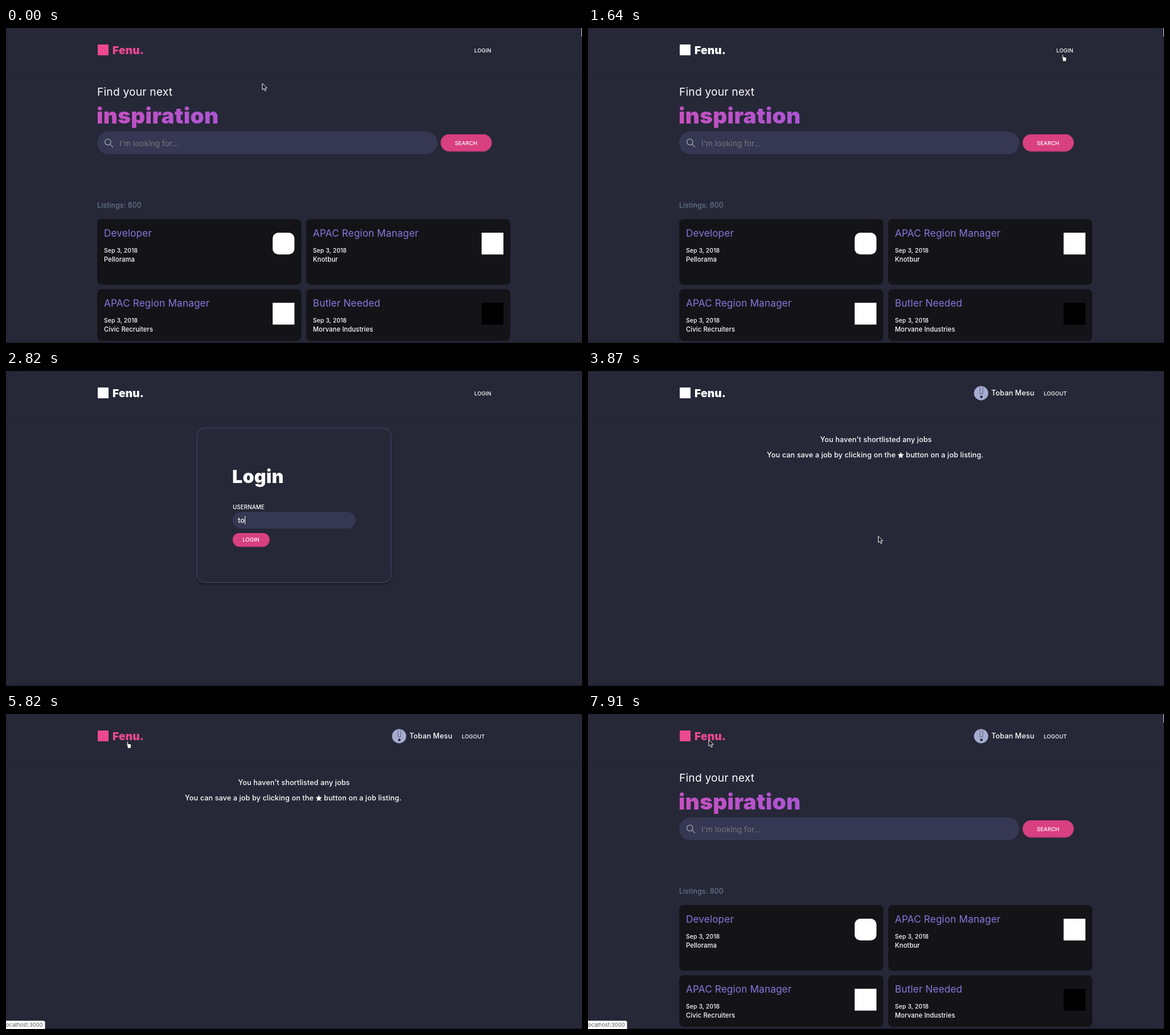
Write an HTML page that moves like this. It is 1011 px wide and 554 px high and loops after 8000 ms.

```html
<!DOCTYPE html>
<html lang="en">
<head>
<meta charset="utf-8">
<title>Job board</title>
<style>
  html, body { margin: 0; height: 100%; overflow: hidden; background: #262838; }
  svg { display: block; width: 100vw; height: 100vh; }
  text { font: 500 12.6px Inter, sans-serif; letter-spacing: .01em; fill: #fff; white-space: pre; }
  .caps { font-size: 9.5px; }
  .mid { text-anchor: middle; }
  .field { fill: #363752; }
  .pink { fill: #d84080; }
  .edge { fill: #bd3876; }
  .title { font-size: 17.1px; font-weight: 400; fill: #8678dc; }
  .date { font-size: 10.4px; }
  .company { font-size: 11.2px; }
</style>
</head>
<body>
<svg viewBox="0 0 1011 554">
  <defs>
    <linearGradient id="violet"><stop stop-color="#c650bf"/><stop offset="1" stop-color="#ad55d3"/></linearGradient>
    <filter id="shadow" x="-10%" y="-10%" width="120%" height="120%" color-interpolation-filters="sRGB">
      <feDropShadow dx="0" dy="3" stdDeviation="1.5" flood-color="#14151f" flood-opacity=".7"/>
    </filter>
  </defs>
  <rect width="1011" height="554" fill="#262838"/>
  <rect y="82" width="1011" height="1" fill="#242636"/>

  <g id="logo">
    <rect x="161" y="29" width="19" height="19"/>
    <text x="187" y="45.5" style="font-size:19px;font-weight:900;fill:inherit">Fenu.</text>
  </g>
  <text id="guest" class="caps" x="822" y="43">LOGIN</text>
  <g id="member">
    <circle cx="690" cy="39" r="12.5" fill="#a6acd0"/>
    <path d="M688 28v12M693 28v12M688 40h5" stroke="#5b5f80" fill="none"/>
    <circle cx="690.5" cy="45.5" r="2.2" fill="#242638"/>
    <text x="708" y="43">Toban Mesu</text>
    <text class="caps" x="800" y="43">LOGOUT</text>
  </g>

  <g id="home">
    <text x="160" y="119" style="font-size:19.2px;font-weight:400">Find your next</text>
    <text x="159" y="168" style="font-size:38.6px;font-weight:900;fill:url(#violet)">inspiration</text>
    <rect class="field" x="160" y="182" width="597" height="40" rx="20"/>
    <path d="M182.8 204.6l5 5M184 200.5a5.2 5.2 0 1 1-10.4 0a5.2 5.2 0 1 1 10.4 0" fill="none" stroke="#a3a3ae" stroke-width="1.3"/>
    <text x="199" y="208" style="font-size:13.5px;font-weight:400;fill:#77777f">I'm looking for...</text>
    <rect class="edge" x="763" y="187" width="89.5" height="30.5" rx="15.2"/>
    <rect class="pink" x="763" y="187" width="89.5" height="29" rx="14.5"/>
    <text class="caps mid" x="807.5" y="205.5">SEARCH</text>
    <text x="160" y="315.5" style="font-size:12.5px;font-weight:400;fill:#718096">Listings: 800</text>
    <g id="cards"></g>
    <rect x="1010" width="1" height="15" fill="#d4d4da"/>
  </g>

  <g id="login">
    <rect x="335" y="100.5" width="341" height="271.5" rx="14" fill="#262838" stroke="#363752" stroke-width="2" filter="url(#shadow)"/>
    <text x="397" y="197" style="font-size:32px;font-weight:900">Login</text>
    <text x="398" y="242.5" style="font-size:9.8px">USERNAME</text>
    <rect class="field" x="398" y="248" width="216" height="29" rx="14.5"/>
    <text id="typed" x="407" y="266.5"></text>
    <rect id="caret" y="255" width="1" height="14.5" fill="#fff"/>
    <rect class="edge" x="398" y="285" width="64.5" height="24.5" rx="12.2"/>
    <rect class="pink" x="398" y="285" width="64.5" height="23" rx="11.5"/>
    <text class="caps mid" x="430" y="300">LOGIN</text>
  </g>

  <g id="saved">
    <text class="mid" x="505.5" y="124.5">You haven't shortlisted any jobs</text>
    <text x="540" y="151.5" text-anchor="end">You can save a job by clicking on the</text>
    <path d="M549 142.5l1.6 3.7 4 .4-3 2.7.9 4-3.5-2.1-3.5 2.1.9-4-3-2.7 4-.4z" fill="#fff"/>
    <text x="558" y="151.5">button on a job listing.</text>
  </g>

  <rect y="552" width="1011" height="2" fill="#1e202d"/>
  <g id="status">
    <rect id="bubble" x="-4" y="539.5" height="18" rx="3" fill="#fff"/>
    <text id="address" x="0" y="550" style="font-size:9.3px;font-weight:400;fill:#55565a"></text>
  </g>

  <g id="cursor" stroke-linejoin="round">
    <path id="arrow" d="M0 0v11.2l2.6-2.4 1.8 4.2 2-.9-1.8-4.1h3.5z" fill="#111" stroke="#fff"/>
    <path id="hand" d="M-1 1Q0-.6 1 1l.6 4q4-.4 5 1.2.8 2-.4 4.8v1.8H.4Q-1-1-4 9-5 6.5-3 6.6L-.4 8z" fill="#fff" stroke="#111" stroke-width=".9"/>
  </g>
</svg>
<script>
const $ = id => document.getElementById(id);
const show = (id, on) => $(id).style.display = on ? '' : 'none';

const jobs = [
  ['Developer', 'Pellorama', '#fff', 10],
  ['APAC Region Manager', 'Knotbur', '#fff', 0],
  ['APAC Region Manager', 'Civic Recruiters', '#fff', 0],
  ['Butler Needed', 'Morvane Industries', '#000', 0],
];
$('cards').innerHTML = jobs.map(([title, company, color, radius], i) => `
  <g transform="translate(${160 + i % 2 * 366.8} ${i < 2 ? 336 : 459.3})">
    <rect width="358.5" height="${i < 2 ? 115.5 : 91}" rx="8" fill="#141418"/>
    <text class="title" x="12" y="30.5">${title}</text>
    <text class="date" x="12" y="59">Sep 3, 2018</text>
    <text class="company" x="12" y="75">${company}</text>
    <rect x="308" y="24" width="38.3" height="38.3" rx="${radius}" fill="${color}"/>
  </g>`).join('');

const LOOP = 8000, START = 285, STEP = 149;  // the screen refreshes in steps
const USER = 'toban';

const progress = (k, from, to) => {
  const u = Math.min(1, Math.max(0, (k - from) / (to - from)));
  return u * u * (3 - 2 * u);
};
const bezier = (u, a, b, c, d) => a.map((_, i) =>
  (1 - u) ** 3 * a[i] + 3 * u * (1 - u) ** 2 * b[i] + 3 * u * u * (1 - u) * c[i] + u ** 3 * d[i]);

function cursorAt(k) {
  if (k < 8) return bezier(progress(k, -1, 7), [450, 97.5], [520, 130], [700, 122], [820, 47.5]);
  if (k < 11) return [833, 46];
  if (k < 28) return bezier(progress(k, 10, 15), [833, 46], [750, 130], [600, 250], [509.5, 290.5]);
  if (k < 35) return bezier(progress(k, 27, 34), [509.5, 290.5], [436, 263], [338, 185], [213.5, 55.5]);
  return k < 51 ? [213, 47.5] : [212, 45.5];
}

function draw(now) {
  const k = Math.floor((now % LOOP - START) / STEP);
  const page = k < 10 || k >= 50 ? 'home' : k < 21 ? 'login' : 'saved';
  for (const id of ['home', 'login', 'saved']) show(id, id === page);
  show('guest', k < 21);
  show('member', k >= 21);
  $('logo').setAttribute('fill', k === 8 || k === 35 ? '#f6a3c6' : k < 8 || k > 35 ? '#ed4892' : '#fff');

  $('typed').textContent = USER.slice(0, Math.max(0, k - 15));
  $('caret').setAttribute('x', 407 + (k > 15 && page === 'login' ? $('typed').getComputedTextLength() : 0));

  const toLogin = k < 14;
  show('status', k >= 10 && toLogin || k >= 36);
  $('status').setAttribute('opacity', toLogin || k === 36 ? .86 : 1);
  $('bubble').setAttribute('width', toLogin ? 97 : 72.5);
  $('address').textContent = 'ocalhost:3000' + (toLogin ? '/login' : '');

  const pointing = k >= 8 && k < 11 || k >= 35 && k < 51;
  show('cursor', k < 16 || k >= 24);
  show('hand', pointing);
  show('arrow', !pointing);
  $('cursor').setAttribute('transform', `translate(${cursorAt(k)})`);
}

(function frame() {
  draw(performance.now());
  requestAnimationFrame(frame);
})();
</script>
</body>
</html>
```
